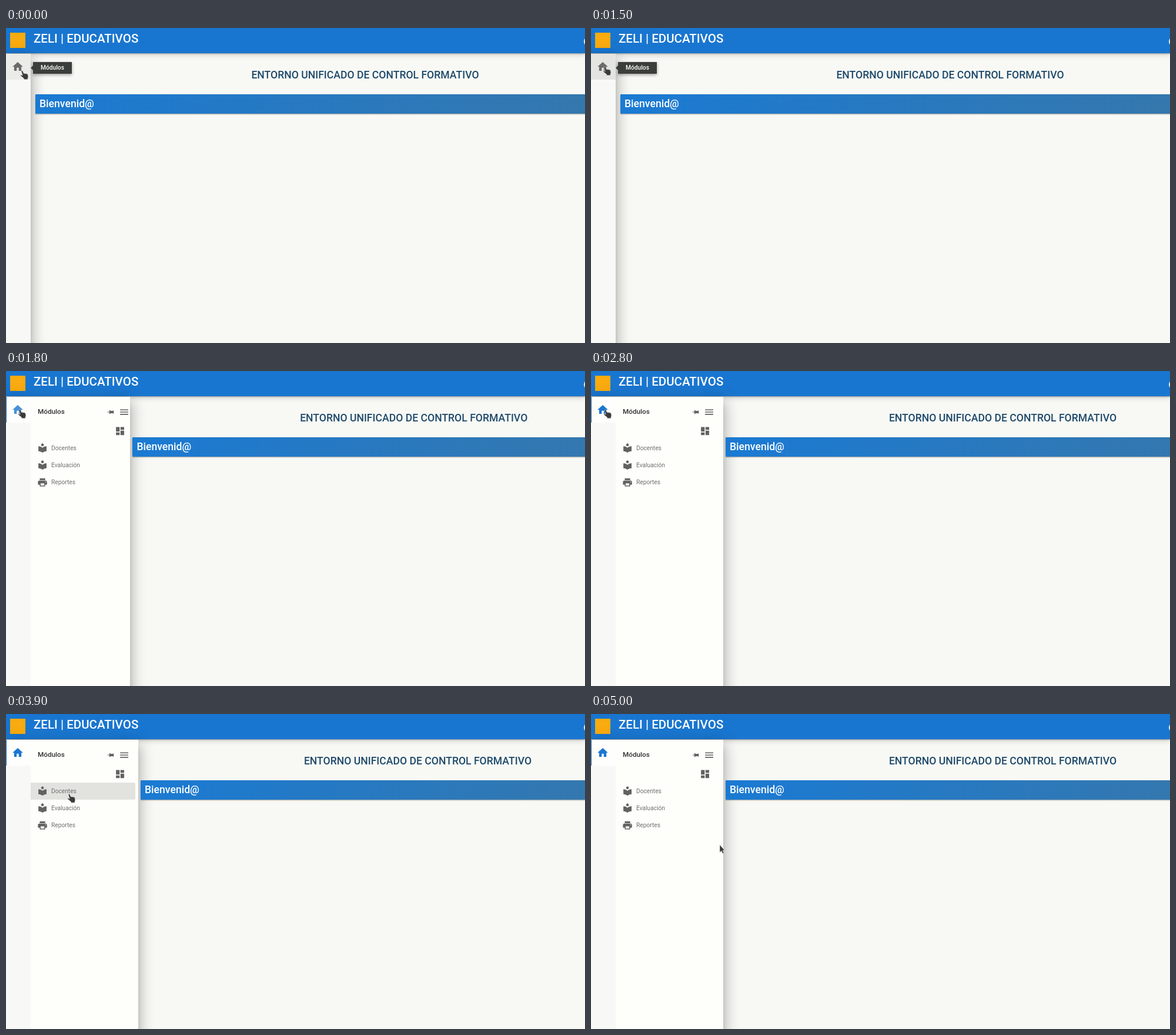
These frames come from a looping animation (985 px wide and 537 px high, 5.1 s). An HTML page:

```html
<!DOCTYPE html>
<html lang="es">
<head>
<meta charset="utf-8">
<title>Menú lateral</title>
<style>
  html, body { margin: 0; width: 100%; height: 100%; overflow: hidden; }
  body { position: relative; background: #f8f9f5; font-family: Roboto, sans-serif; }
  div, svg { position: absolute; }
  .text { line-height: 20px; white-space: nowrap; }
  .bold { font-weight: 500; }

  #header { left: 0; top: 0; width: 100%; height: 43px; background: #1976d0;
    box-shadow: 0 1px 2px rgba(0,0,0,.35), 0 3px 9px rgba(0,0,0,.16); }
  #logo { left: 7px; top: 8px; width: 26px; height: 26px; background: #f9ab0f; }
  #brand { left: 47px; top: 8px; font-size: 20.5px; color: #fff; }
  #account { left: 983px; top: 15px; width: 16px; height: 16px; border-radius: 50%; background: #e6eef6; }

  #sidebar { left: 0; top: 44px; height: 520px; background: #fefefb;
    box-shadow: 0 7px 9px -4px rgba(0,0,0,.25), 0 14px 21px 2px rgba(0,0,0,.17), 0 5px 26px 4px rgba(0,0,0,.13); }
  #clip { inset: 0; overflow: hidden; }
  #strip { left: 0; top: 0; width: 42px; height: 100%; background: #f8f8f6; }
  #tile { left: 0; top: 0; width: 42px; height: 44px; box-sizing: border-box; }
  #clip svg { left: 0; top: -44px; }
  .row { left: 42px; width: 178px; height: 29px; background: #e2e2df; border-radius: 0 2px 2px 0; }
  .item { left: 77px; font-size: 10.2px; color: #6f706e; }
  #heading { left: 54px; top: 15px; font-size: 11.7px; color: #2f302f; }

  #content { top: 0; right: -187px; height: 0; }
  #title { width: 100%; top: 70px; text-align: center; font-size: 17.6px; color: #1f4a6b; }
  #bar { left: 0; top: 113px; width: 100%; height: 33px; border-radius: 1px;
    background: linear-gradient(100deg, #1a7ad3, #3a77a6); box-shadow: 0 1px 2px rgba(0,0,0,.4); }
  #welcome { left: 7px; top: 6px; font-size: 17.6px; color: #fff; }

  #tooltip { left: 46px; top: 58px; width: 66px; height: 20px; background: #3b3e3b;
    font-size: 10.2px; color: #fff; text-align: center; box-shadow: 0 2px 5px rgba(0,0,0,.35); }
  #tooltip::before { content: ""; position: absolute; left: -4px; top: 6px;
    border: 4px solid transparent; border-left: 0; border-right-color: #3b3e3b; }
  #pointer { left: 0; top: 0; pointer-events: none; }
</style>
</head>
<body>
<div id="header">
  <div id="logo"></div>
  <div id="brand" class="text bold">ZELI | EDUCATIVOS</div>
  <div id="account"></div>
</div>

<div id="sidebar">
  <div id="clip">
    <div id="strip"></div>
    <div id="tile"></div>
    <div class="row" style="top:44px"></div>
    <div class="row" style="top:73px"></div>
    <div class="row" style="top:102px"></div>
    <div class="row" style="top:131px"></div>
    <div id="heading" class="text bold">Módulos</div>
    <div class="text item" style="top:78px">Docentes</div>
    <div class="text item" style="top:107px">Evaluación</div>
    <div class="text item" style="top:136px">Reportes</div>
    <svg width="230" height="537" fill="#626361">
      <defs>
        <path id="book" d="M12 11.55C9.64 9.35 6.48 8 3 8v11c3.48 0 6.64 1.35 9 3.55 2.36-2.19 5.52-3.55 9-3.55V8c-3.48 0-6.64 1.35-9 3.55zM12 8c1.66 0 3-1.34 3-3s-1.34-3-3-3-3 1.34-3 3 1.34 3 3 3z"/>
      </defs>
      <path id="home" transform="translate(9.4 55.4) scale(.88)" d="M10 20v-6h4v6h5v-8h3L12 3 2 12h3v8z"/>
      <g id="menuIcons">
        <path transform="translate(178 70) rotate(90) scale(.53) translate(-12 -12)" d="M16 12V4h1V2H7v2h1v8l-2 2v2h5.2v6h1.6v-6H18v-2z"/>
        <path transform="translate(191.8 60.8) scale(.77)" d="M3 18h18v-2H3zm0-5h18v-2H3zm0-7v2h18V6z"/>
        <path transform="translate(184.8 93.2) scale(.77)" d="M3 13h8V3H3zm0 8h8v-6H3zm10 0h8V11h-8zm0-18v6h8V3z"/>
        <use href="#book" transform="translate(52.8 122) scale(.77)"/>
        <use href="#book" transform="translate(52.8 151) scale(.77)"/>
        <path transform="translate(52.8 180.6) scale(.77)" d="M19 8H5c-1.66 0-3 1.34-3 3v6h4v4h12v-4h4v-6c0-1.66-1.34-3-3-3zm-3 11H8v-5h8zm3-7c-.55 0-1-.45-1-1s.45-1 1-1 1 .45 1 1-.45 1-1 1zM18 3H6v4h12z"/>
      </g>
    </svg>
  </div>
</div>

<div id="content">
  <div id="title" class="text bold">ENTORNO UNIFICADO DE CONTROL FORMATIVO</div>
  <div id="bar"><div id="welcome" class="text bold">Bienvenid@</div></div>
</div>

<div id="tooltip" class="text bold">Módulos</div>

<svg id="pointer" width="985" height="537" fill="#3a3b3a" stroke="#f4f4f0" stroke-width=".5">
  <path id="hand" d="M-5-6.5q1.2-1.6 2.5 0l2 4.2q1.5-1 2.3.2 1.5-.8 2.2.4 1.5-.6 2 .8l.8 3.4q.2 2-.8 3v2.2h-6.5v-1.6l-5.3-4.3q-1.2-1.6.6-1.8l2.4 1z"/>
  <path id="arrow" d="M0 0v13l3-2.5L5 15l2-1-1.8-4.5L8 9z"/>
</svg>

<script>
const LOOP = 5100, STEP = 100;
const OPEN_AT = 1610, OPEN_TIME = 400, CLICK = 1600, ARROW_AT = 4700;
const $ = id => document.getElementById(id);
const rows = [...document.querySelectorAll('.row')];

// time, x, y of the hand
const handPath = [
  [0, 31, 80], [200, 27, 73], [2000, 27, 73], [2100, 28, 73], [2800, 28, 73],
  [2900, 36, 77], [3100, 66, 94], [3300, 101, 118], [3400, 106, 132], [3500, 108, 133],
  [3800, 108, 133], [4000, 114, 154], [4200, 119, 168], [4400, 121, 176],
  [4500, 123, 200], [4600, 126, 224], [5100, 126, 224]
];
// start of fade in, start of fade out
const hovers = [[3050, 3420], [3390, 4000], [4000, 4500], [4500, 4600]];

const ramp = (t, start, length) => Math.min(1, Math.max(0, (t - start) / length));

function along(path, t) {
  const i = path.findIndex(p => p[0] > t);
  const [a, b] = [path[i - 1], path[i]];
  const k = (t - a[0]) / (b[0] - a[0]);
  return [a[1] + (b[1] - a[1]) * k, a[2] + (b[2] - a[2]) * k];
}

// cubic-bezier(.25, .8, .25, 1)
function ease(x) {
  const curve = (s, p, q) => 3 * s * (1 - s) ** 2 * p + 3 * s * s * (1 - s) * q + s ** 3;
  let low = 0, high = 1;
  for (let i = 0; i < 24; i++) {
    const mid = (low + high) / 2;
    if (curve(mid, .25, .25) < x) low = mid; else high = mid;
  }
  return curve(low, .8, 1);
}

const place = (shape, x, y) => shape.setAttribute('transform', `translate(${x} ${y})`);

function draw(t) {
  const active = t >= CLICK;
  const open = ease(ramp(t, OPEN_AT, OPEN_TIME));

  $('sidebar').style.width = 42 + 182.5 * open + 'px';
  $('content').style.left = 50 + 179 * open + 'px';
  $('tooltip').style.visibility = active ? 'hidden' : 'visible';
  $('heading').style.visibility = $('menuIcons').style.visibility = active ? 'visible' : 'hidden';

  $('tile').style.background = active ? '#fefefc' : t < 500 ? '#ebebe8' : '#e4e4e1';
  $('tile').style.borderLeft = active ? '1px solid #1976d2' : 'none';
  $('home').style.fill = active ? '#1976d2' : '#6b6b69';
  $('home').style.opacity = active ? .6 + .4 * ramp(t, CLICK, 400) : 1;

  rows.forEach((row, i) => {
    const [start, end] = hovers[i];
    row.style.opacity = ramp(t, start, 100) - ramp(t, end, 100);
  });

  const isArrow = t >= ARROW_AT;
  $('hand').style.display = isArrow ? 'none' : '';
  $('arrow').style.display = isArrow ? '' : 'none';
  place($('hand'), ...along(handPath, t));
  place($('arrow'), ...(t < 5000 ? [123, 243] : [219, 223]));
}

const begin = performance.now();
function tick() {
  const t = (performance.now() - begin) % LOOP;
  draw(Math.floor(t / STEP) * STEP);
  requestAnimationFrame(tick);
}
tick();
</script>
</body>
</html>
```
